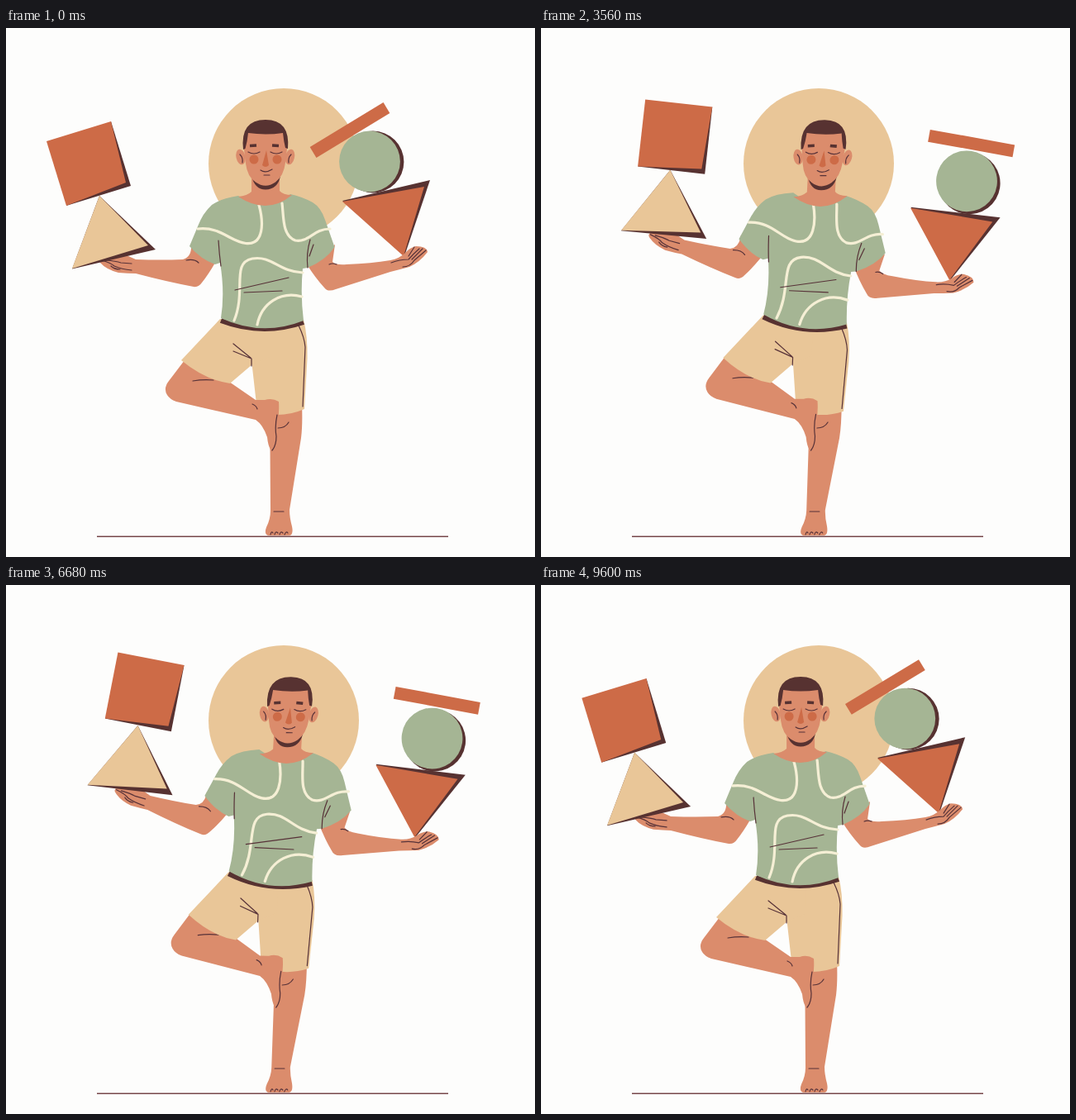
These frames come from a looping animation (640x640 px, 9640 ms). An HTML page:

```html
<!DOCTYPE html>
<html lang="en">
<head>
<meta charset="utf-8">
<title>Balance</title>
<style>
  html, body { margin: 0; width: 100%; height: 100%; overflow: hidden; background: #fdfdfc; }
  svg { display: block; width: 100vw; height: 100vh; }
  .skin { fill: #db8c6c; }
  .gold { fill: #e9c698; }
  .orange { fill: #cd6b47; }
  .green { fill: #a5b594; }
  .dark { fill: #573231; }
  .line { fill: none; stroke: #573238; stroke-width: 1.2; stroke-linecap: round; stroke-linejoin: round; }
  .pale { fill: none; stroke: #f5efd5; stroke-width: 3.2; stroke-linecap: round; }
  .band { fill: none; stroke: #573231; stroke-width: 6; }
  .brow { fill: none; stroke: #573231; stroke-width: 3.5; }
</style>
</head>
<body>
<svg viewBox="0 0 640 640">
  <circle class="gold" cx="336" cy="164" r="91"/>
  <path d="M110 615.3H535" stroke="#76474a" stroke-width="1.4"/>

  <g id="bar">
    <rect class="orange" x="364" y="116" width="104" height="15" transform="rotate(-31.3 416 123.5)"/>
  </g>
  <g id="ball">
    <circle class="dark" cx="444" cy="162" r="37.4"/>
    <circle class="green" cx="440" cy="161.5" r="36.9"/>
  </g>
  <g id="wedge">
    <path class="dark" d="M407 209L513 184L482 276Z"/>
    <path class="orange" d="M407 210L506 192L481 276Z"/>
  </g>
  <g id="box">
    <path class="dark" d="M127 113L151 191L73 215Z"/>
    <path class="orange" d="M49 137L127 113L145 187L73 215Z"/>
  </g>

  <g id="armL">
    <path class="skin" d="M224 262Q225 277 214 280Q188 281 157 280L148 276L118 277Q111 280 114 284
      Q121 292 136 296Q148 297 157 297Q195 307 227 313Q233 314 237 308Q245 298 253 284Z"/>
    <path class="line" d="M115 281Q127 284 131 288Q140 292 152 293M121 281Q133 282 139 284L152 285M127 288Q131 292 138 292M218 281Q228 279 233 284"/>
  </g>
  <g id="cone">
    <path class="dark" d="M113 203L181 268L80 291.5Z"/>
    <path class="gold" d="M113 203L172 263L80 291Z"/>
  </g>
  <g id="armR">
    <path class="skin" d="M398 262L395 283Q399 287 412 286Q442 285 465 281Q476 279 483 272Q488 266 496 264
      Q509 264 510 271Q501 283 488 289Q477 292 465 295L399 316Q389 320 385 314Q374 302 364 286Z"/>
    <path class="line" d="M466 284Q476 280 487 280Q492 274 500 267M480 289Q489 289 494 281L508 269M487 276L494 265M491 280L504 267M391 286Q395 284 400 286"/>
  </g>

  <g id="leg">
    <path class="skin" d="M322 455H358Q359 480 357 496L343 583Q343 592 346 603Q348 613 343 614H317
      Q312 612 315 604Q320 594 320 584L319.5 505Z"/>
    <path class="line" d="M324 585H336M329 484Q338 484 342 477M320 613Q321 608 323 611M325 613Q326 608 329 611M331 613Q332 608 335 611M337 613Q339 608 341 611"/>
  </g>
  <g id="hip">
    <path class="gold" d="M290 355L360 353Q365 372 364.5 400L361 461Q345 468 328 468Q312 467 303 455L297 402L270 380Z"/>
    <path class="line" d="M354 360Q361 374 362 386L359 458"/>
  </g>
  <g id="shin">
    <path class="skin" d="M216 402L197 427Q190 436 195 444Q198 449 206 452L302 474Q311 480 316 495Q317 505 320 510
      Q324 513 327 507Q329 496 328 481Q331 468 330 452Q322 447 313 450L302 450L270 428Z"/>
    <path class="line" d="M226 427Q238 425 251 426M298 455Q303 457 304 461M328 468Q325 482 327 494Q327 505 322 511"/>
  </g>
  <g id="thigh">
    <path class="gold" d="M259 352L320 356L320 398L298 407L271 430Q241 426 212 402Z"/>
    <path class="line" d="M275 382L296 399M275 391L297 400V409"/>
  </g>

  <g id="torso">
    <path class="band" d="M260 354Q310 373 360 356"/>
    <path class="green" d="M281 203Q260 206 249 214Q238 224 232 240L222 264Q236 280 253 286L259 284
      Q265 320 260 351Q310 374 360 354Q356 322 359 291L365 290Q387 281 397.5 265L386 232
      Q381 217 371 211Q358 204 344 201Q316 225 281 203Z"/>
    <path class="pale" d="M232 243C260 240 270 258 290 260.5C312 263 312 236 306 214
      M334 212C336 228 334 251 350 257C366 260 372 243 392 243
      M276 354C291 318 272 284 298 279C322 275 330 295 359 296
      M304 359C309 333 332 318 358 325"/>
    <path class="line" d="M257 257Q258 274 260 288M368 256Q363 273 365 290M372 262L367 276M277 317L342 302M288 320L334 318"/>
  </g>

  <g id="head">
    <path class="skin" d="M297 176V198Q292 203 281 204Q316 227 346 202Q335 202 331 197V176Z"/>
    <path class="dark" d="M297 179Q301 195.500 314 195.500Q329 195 332 179Z"/>
    <ellipse class="skin" cx="284" cy="156" rx="5.5" ry="9.5" transform="rotate(-12 284 156)"/>
    <ellipse class="skin" cx="343.5" cy="156" rx="5.5" ry="9.5" transform="rotate(12 343.5 156)"/>
    <path class="skin" d="M287 138Q290 122 314 120Q338 122 341 138L338 163Q336 179 326 186.5Q314 195 302 186.5Q292 180 290 164Z"/>
    <path class="dark" d="M287 147Q283 111 314 111Q344 111 341 146L338 145Q336 137 335 127Q314 130 293 127Q292 137 289.5 146Z"/>
    <circle class="orange" cx="300" cy="159" r="5.5"/>
    <circle class="orange" cx="328" cy="159" r="5.5"/>
    <path class="orange" d="M315 148L318 166Q314 170 310 166Z"/>
    <path class="brow" d="M295 142.5L303 142M322 142L330 142.5"/>
    <path class="line" d="M293 150Q300 154 307 150M320 150Q327 154 334 150M308 172Q314 176 322 171M312 178H319M283 153Q287 157 286 163M345 153Q341 157 342 163"/>
  </g>
</svg>
<script>
const LOOP = 9640, PEAK = 4760;

// Three points at rest and where they go at full lean.
const limbs = {
  armL:  { lag: 390, from: [224, 265, 232, 313, 113, 282], to: [247, 250, 243, 300, 136, 240] },
  armR:  { lag: 320, from: [398, 264, 389, 317, 510, 269], to: [421, 279, 400, 328, 528, 317] },
  leg:   { lag: 370, from: [358, 464, 320, 585, 344, 585], to: [365, 464, 321.5, 585, 345, 585] },
  hip:   { lag: 370, from: [259, 353, 360, 357, 330, 468], to: [272, 347, 373, 362, 336, 468] },
  shin:  { lag: 370, from: [193, 435, 330, 452, 322, 511], to: [201.5, 430, 336, 451, 328, 511] },
  thigh: { lag: 370, from: [259, 353, 212, 402, 297, 401], to: [272, 347, 223, 398, 307, 399] },
  torso: { lag: 370, from: [281, 203, 260, 352, 360, 355], to: [313, 198, 272, 346, 373, 361] },
  head:  { lag: 370, from: [286, 140, 341, 140, 314, 196], to: [323, 140, 378, 141, 347, 197] }
};

// Rigid objects: pivot travels from at to end along a slight arc while turning.
const props = {
  bar:   { lag: 310, at: [416, 123.5], end: [552, 154], arc: [0, -10.5], turn: 54 },
  ball:  { lag: 310, at: [440, 161.5], end: [537.5, 198], arc: [0, -6], turn: 40 },
  wedge: { lag: 310, at: [482, 276], end: [499, 314], arc: [0, 0], turn: 25.9 },
  box:   { lag: 410, at: [100, 164], end: [184.5, 123], arc: [-1, -2.5], turn: 33, turnLag: 540 },
  cone:  { lag: 390, at: [130.5, 279.5], end: [156, 241], arc: [-1.3, -1], turn: 24.7 }
};

const wave = t => (1 - Math.cos(2 * Math.PI * t / LOOP)) / 2;
const sway = (t, lag) => (wave(t - lag) - wave(-lag)) / (wave(PEAK - lag) - wave(-lag));

// Affine matrix carrying one triangle onto another.
function affine([x0, y0, x1, y1, x2, y2], to) {
  const ux = x1 - x0, uy = y1 - y0, vx = x2 - x0, vy = y2 - y0;
  const det = ux * vy - vx * uy;
  const row = k => {
    const p = to[2 + k] - to[k], q = to[4 + k] - to[k];
    const a = (p * vy - q * uy) / det, c = (q * ux - p * vx) / det;
    return [a, c, to[k] - a * x0 - c * y0];
  };
  const [a, c, e] = row(0), [b, d, f] = row(1);
  return [a, b, c, d, e, f];
}

const node = id => document.getElementById(id);
const rest = [1, 0, 0, 1, 0, 0];
const joints = Object.entries(limbs).map(([id, l]) => ({ el: node(id), lag: l.lag, full: affine(l.from, l.to) }));
const items = Object.entries(props).map(([id, p]) => ({ el: node(id), ...p }));

function pose(t) {
  for (const { el, lag, full } of joints) {
    const m = sway(t, lag);
    el.setAttribute('transform', `matrix(${rest.map((r, i) => r + (full[i] - r) * m)})`);
  }
  for (const { el, lag, at, end, arc, turn, turnLag = lag } of items) {
    const m = sway(t, lag);
    const [x, y] = at.map((v, i) => v + (end[i] - v) * m + 4 * m * (1 - m) * arc[i]);
    el.setAttribute('transform',
      `translate(${x} ${y}) rotate(${turn * sway(t, turnLag)}) translate(${-at[0]} ${-at[1]})`);
  }
}

const start = performance.now();
function tick() {
  pose((performance.now() - start) % LOOP);
  requestAnimationFrame(tick);
}
tick();
</script>
</body>
</html>
```
